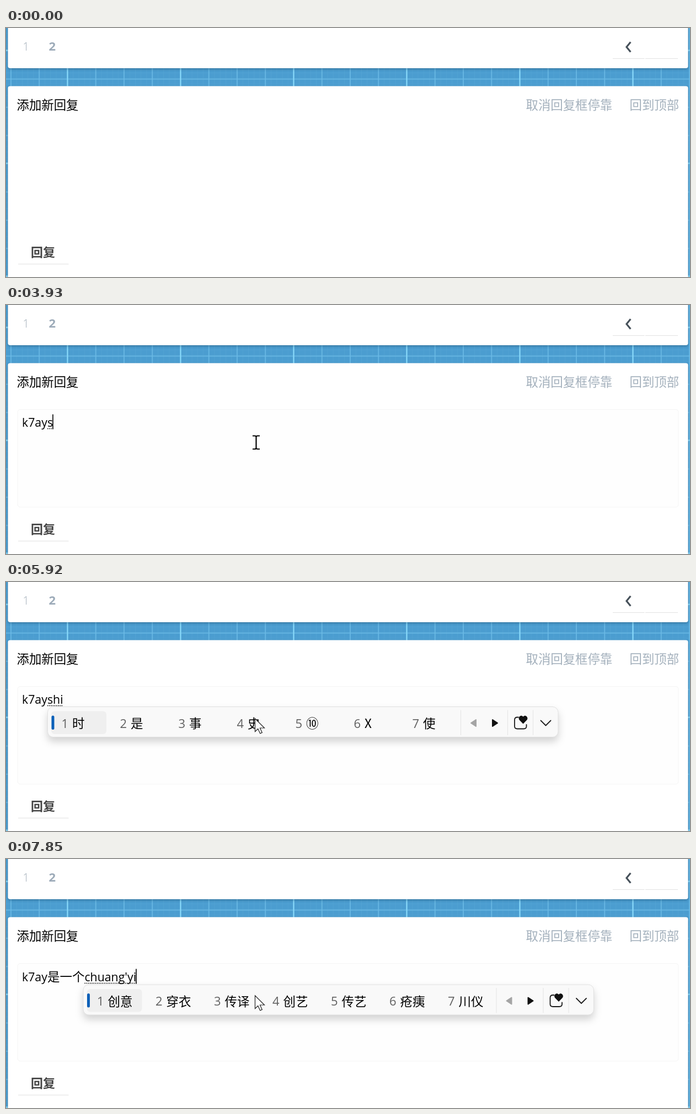
Animation, 1240 px wide and 452 px high, one loop 8000 ms. Source, as an HTML page:

```html
<!DOCTYPE html>
<html lang="zh-CN">
<head>
<meta charset="utf-8">
<title>回复</title>
<style>
html, body { margin: 0; width: 100%; height: 100%; overflow: hidden; background: #4b9dd0; }
svg { display: block; width: 1240px; height: 452px; }
text { font-family: "Open Sans", "Noto Sans CJK SC", "Noto Sans CJK JP", sans-serif; }
.han { font-family: "Noto Sans CJK SC", "Noto Sans CJK JP", sans-serif; font-size: 22.5px; }
.latin { font-size: 21.3px; }
.title { font-weight: 300; font-size: 22.4px; }
.link { font-weight: 300; font-size: 22.4px; fill: #a3b0bc; }
.num { font-size: 22px; fill: #606060; }
.card { fill: #fff; filter: drop-shadow(0 2px 2px rgba(0, 20, 40, .28)); }
.panel { fill: #f9f9f9; stroke: #e0e0e0; filter: drop-shadow(0 8px 7px rgba(0, 0, 0, .17)); }
</style>
</head>
<body>
<svg viewBox="0 0 1240 452">
  <defs>
    <pattern id="fine" x="111" y="40" width="10.25" height="10.25" patternUnits="userSpaceOnUse">
      <path d="M0 .5H10.25M.5 0V10.25" stroke="#7cc4ea" stroke-opacity=".12"/>
    </pattern>
    <pattern id="minor" x="110.5" y="40.5" width="51.25" height="51.25" patternUnits="userSpaceOnUse">
      <path d="M0 1H51.25M1 0V51.25" stroke="#74c3ec" stroke-width="1.6" stroke-opacity=".75"/>
    </pattern>
    <pattern id="major" x="110" y="39" width="205" height="205" patternUnits="userSpaceOnUse">
      <path d="M0 1.5H205M1.5 0V205" stroke="#8adbfb" stroke-width="2"/>
    </pattern>
  </defs>

  <rect width="1240" height="452" fill="#4b9dd0"/>
  <rect width="1240" height="452" fill="url(#fine)"/>
  <rect width="1240" height="452" fill="url(#minor)"/>
  <rect width="1240" height="452" fill="url(#major)"/>

  <rect class="card" x="3.5" y="-20" width="1233" height="93" rx="4"/>
  <rect class="card" x="3.5" y="105.5" width="1233" height="380" rx="4"/>

  <text x="30.5" y="41" font-size="20" font-weight="300" fill="#9fabb6">1</text>
  <text x="77.5" y="41" font-size="22" font-weight="700" fill="#9dabb9">2</text>
  <path d="M1132.3 25.5L1125 34.5L1132.3 43.5" fill="none" stroke="#47525b" stroke-width="3.2"/>
  <path d="M1100 55.5H1157.5M1159 55.5H1218M22 428.5H113.5" stroke="#e2e2e2" stroke-width="1.2"/>

  <text class="han title" x="19.5" y="148.3">添加新回复</text>
  <text class="han link" x="942.5" y="148.3">取消回复框停靠</text>
  <text class="han link" x="1130.5" y="148.3">回到顶部</text>
  <text class="han" x="45" y="415.3" font-weight="700" style="font-size:22px" fill="#444">回复</text>

  <rect id="field" x="21" y="189.5" width="1198" height="177.5" rx="5" fill="#fefefe" stroke="#f5f5f5"/>

  <g id="line">
    <text id="latin" class="latin" x="29" y="221"></text>
    <text id="han" class="han" y="221"></text>
    <text id="comp" class="latin" y="221"></text>
    <path id="dots" stroke="#000" stroke-width="1.6" stroke-dasharray="1.6 1.6"/>
    <rect id="caret" y="198.5" width="1.6" height="27"/>
  </g>

  <g id="ime">
    <rect class="panel" x=".5" y=".5" width="925.5" height="55" rx="10"/>
    <rect x="7" y="8.5" width="100" height="41.5" rx="6" fill="#efefef"/>
    <rect x="7.5" y="16.5" width="5" height="25.5" rx="2.5" fill="#0a60b8"/>
    <g id="words"></g>
    <path d="M749.5 6.5V52M834.5 6.5V52M880.5 6.5V52" stroke="#e3e3e3"/>
    <g stroke-width="2" stroke-linejoin="round">
      <path d="M768 30L777 24V36Z" fill="#a5a5a5" stroke="#a5a5a5"/>
      <path d="M816 30L807 24V36Z" fill="#111" stroke="#111"/>
    </g>
    <g fill="none" stroke="#1a1a1a" stroke-width="1.8" stroke-linecap="round" stroke-linejoin="round">
      <path d="M854 19.5H852Q847 19.5 847 24.5V36Q847 40.5 852 40.5H863.5Q868.5 40.5 868.5 36V33"/>
      <path d="M894.5 25.5L903.5 34.5L912.5 25.5"/>
    </g>
    <path d="M862.5 31.5L855.7 24.5C852 20 858.5 13.5 862.5 18.5C866.500 13.5 873 20 869.300 24.5Z" fill="#111"/>
  </g>

  <g id="mouse">
    <path id="arrow" d="M0 0V23.500L5.300 18.500L9.200 27L12.800 25.400L9 17H17Z" fill="#fff" stroke="#222" stroke-width="1.2"/>
    <path id="beam" d="M-6.500 -12H-2.500Q0 -12 0 -9.500Q0 -12 2.500 -12H6.500M0 -10V10M-6.500 12H-2.500Q0 12 0 9.500Q0 12 2.500 12H6.500" fill="none" stroke="#000" stroke-width="2.200"/>
  </g>
</svg>
<script>
const LOOP = 8000, CLICK = 720, IME_OPEN = 3990;
const NAME = 'k7ay';

const S = '是时上说所三四', SH = '是上说谁少水书', SHI = '时是事史⑩X使';
const YIGE = '一个 一格 亦歌 一哥 一歌 毅哥 壹个';
const IDEA = '创意 穿衣 传译 创艺 传艺 疮痍 川仪';

// time, latin, committed han, composing letters, caret shown, candidates
const steps = [
  [0, '', '', '', 0],
  [720, '', '', '', 1],
  [1130, 'k', '', '', 0],
  [1200, 'k', '', '', 1],
  [1730, 'k', '', '', 0],
  [2260, 'k7', '', '', 1],
  [2790, 'k7', '', '', 0],
  [2990, 'k7a', '', '', 1],
  [3320, NAME, '', '', 1],
  [3850, NAME, '', '', 0],
  [3920, NAME, '', 's', 1],
  [3990, NAME, '', 's', 1, S],
  [4060, NAME, '', 'sh', 1, SH],
  [4130, NAME, '', 'shi', 1, SHI],
  [4510, NAME, '时', '', 1],
  [5040, NAME, '时', '', 0],
  [5100, NAME, '', '', 1],
  [5170, NAME, '', 's', 1],
  [5230, NAME, '', 's', 1, S],
  [5300, NAME, '', 'sh', 1, SH],
  [5370, NAME, '', 'shi', 1, SHI],
  [5920, NAME, '', 'shi', 0, SHI],
  [5990, NAME, '是', '', 1],
  [6330, NAME, '是', 'y', 1, '一有也要又与用'],
  [6390, NAME, '是', 'yi', 1, '一以已意亦易亿'],
  [6590, NAME, '是', "yi'g", 1, YIGE],
  [6660, NAME, '是', "yi'ge", 1, YIGE],
  [6890, NAME, '是一个', '', 1],
  [6990, NAME, '是一个', 'c', 1],
  [7060, NAME, '是一个', 'c', 1, '从才吃出陈成车'],
  [7120, NAME, '是一个', 'ch', 1, '出吃成车长场陈'],
  [7200, NAME, '是一个', 'chu', 1, '出处初除楚触储'],
  [7280, NAME, '是一个', 'chua', 1, '穿传船床创窗川'],
  [7370, NAME, '是一个', 'chuan', 1, '穿传船川串喘床'],
  [7450, NAME, '是一个', 'chuang', 1, '床创窗闯疮幢怆'],
  [7780, NAME, '是一个', "chuang'y", 1, IDEA],
  [7850, NAME, '是一个', "chuang'yi", 1, IDEA]
];

// time, x, y
const moves = [
  [120, 1003, 432], [190, 925, 390], [250, 800, 345], [320, 665, 303],
  [380, 545, 270], [450, 475, 250], [520, 440, 242], [580, 461, 253], [720, 453.5, 249.5]
];

const $ = id => document.getElementById(id);
const at = (list, t) => list.findLast(row => row[0] <= t);
const show = (el, on) => el.setAttribute('visibility', on ? 'visible' : 'hidden');
const shift = (el, x, y) => el.setAttribute('transform', `translate(${x} ${y})`);

function addText(parent, cls, x, y) {
  const el = document.createElementNS('http://www.w3.org/2000/svg', 'text');
  el.setAttribute('class', cls);
  el.setAttribute('x', x);
  el.setAttribute('y', y);
  parent.append(el);
  return el;
}

const words = Array.from({ length: 7 }, (_, i) => {
  addText($('words'), 'num', 25.5 + 106 * i, 38.5).textContent = i + 1;
  return addText($('words'), 'han', 45 + 106 * i, 39);
});

function place(el, text, x) {
  el.textContent = text;
  el.setAttribute('x', x);
  return x + (text ? el.getComputedTextLength() : 0);
}

function drawLine([, latin, han, comp, caret, list]) {
  const start = place($('han'), han, place($('latin'), latin, 29));
  const end = place($('comp'), comp, start);
  const drop = han ? 1 : 0;
  shift($('line'), 0, drop);
  $('dots').setAttribute('d', comp ? `M${start} 224.5H${end}` : '');
  $('caret').setAttribute('x', Math.round(end) - 0.8 + (end === 29 ? 0.8 : 0));
  show($('caret'), caret);

  show($('ime'), list);
  if (!list) return;
  shift($('ime'), Math.round(start) - 2.5 * drop, 226 + 1.5 * drop);
  const items = list.includes(' ') ? list.split(' ') : [...list];
  words.forEach((el, i) => { el.textContent = items[i]; });
}

function drawMouse(t) {
  const move = at(moves, t);
  show($('mouse'), move);
  if (!move) { show($('arrow'), false); show($('beam'), false); return; }
  const [, x, y] = move;
  const arrow = t >= IME_OPEN || y > 367;
  show($('arrow'), arrow);
  show($('beam'), !arrow);
  shift($('mouse'), arrow ? x - 2 : x, arrow ? y - 1.5 : y);
}

let last;
const origin = performance.now();
function frame() {
  const t = (performance.now() - origin) % LOOP;
  const step = at(steps, t);
  if (step !== last) drawLine(last = step);
  drawMouse(t);
  show($('field'), t >= CLICK);
  requestAnimationFrame(frame);
}
frame();
</script>
</body>
</html>
```
